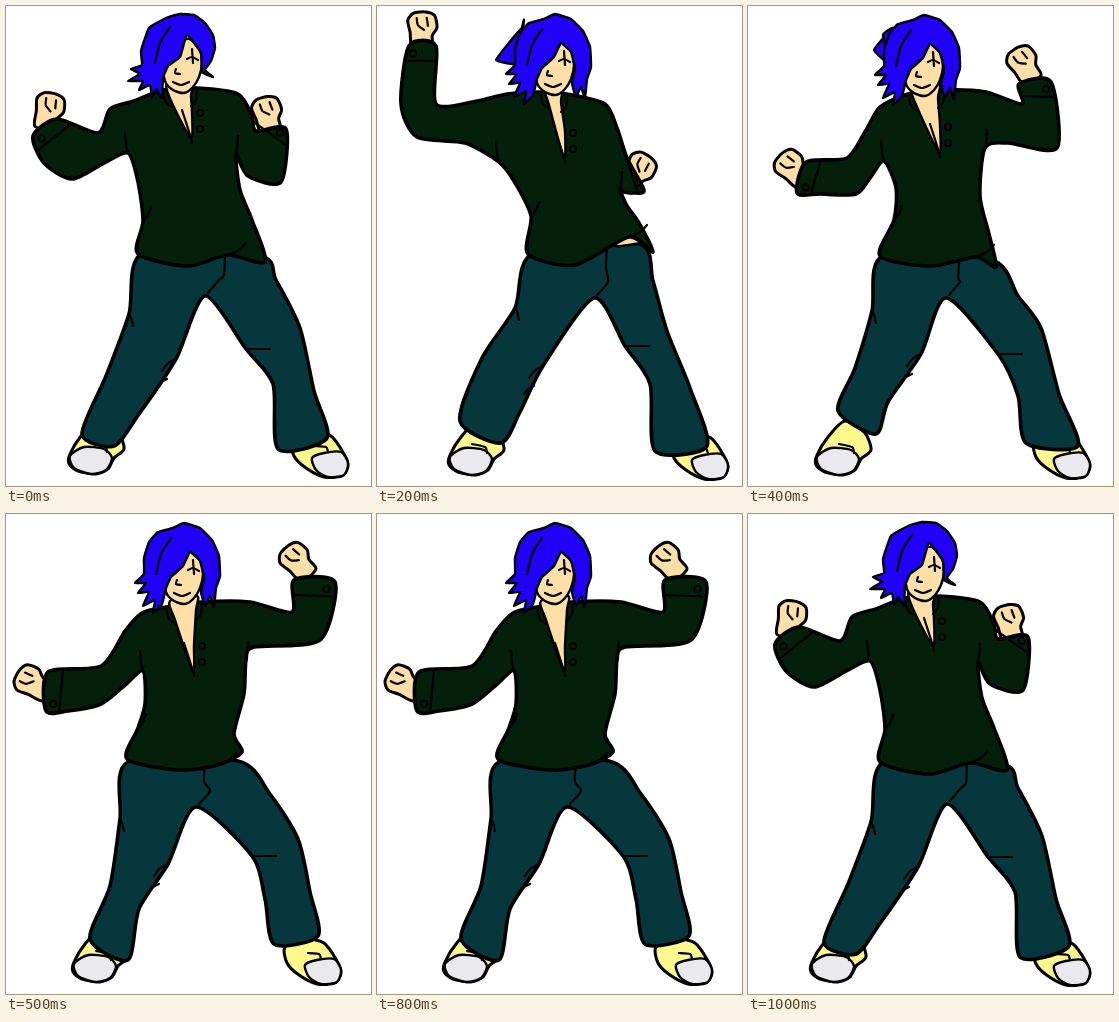
Write an HTML page that moves like this. It is 365x480 px and loops after 1.1 s.

```html
<!DOCTYPE html>
<html lang="en">
<head>
<meta charset="utf-8">
<title>Dance loop</title>
<style>
html, body { margin: 0; width: 100%; height: 100%; overflow: hidden; background: #fff; }
svg { display: block; width: 365px; height: 480px; }
path { stroke: #000; stroke-linejoin: round; stroke-linecap: round; }
</style>
</head>
<body>
<svg id="stage" viewBox="0 0 365 480"></svg>
<script>
const STEP = 100;
const ORDER = ['guard', 'windup', 'raise', 'guard', 'sway', 'spread', 'swing', 'high', 'spread', 'sway', 'guard'];
const SKIN = '#ffdfa8', HAIR = '#2000f6', SHIRT = '#04200a', DENIM = '#06373c', SHOE = '#fdf98c', TOE = '#e9e9ee';

const pts = s => s.split(',').map(p => p.trim().split(' ').map(Number));
const add = ([x, y], dx, dy) => [x + dx, y + dy];
const mix = (a, b, t = 0.5) => a.map((v, i) => v + (b[i] - v) * t);
const shift = (list, [dx, dy]) => list.map(p => add(p, dx, dy));

// Shirt: collar, left arm, left side, hem, right side, right arm, collar.
// Pants: outer left leg, inner left, crotch, inner right, outer right.
const pose = (shirt, pants, hands, shoes, head, tip, tufts = '') => ({
  shirt: pts(shirt), pants: pts(pants), hands: pts(hands), shoes: pts(shoes),
  head: pts(head), tip: pts(tip), tufts: tufts ? pts(tufts) : []
});

const guard = pose(
  '157 84,128 95,104 103,92 127,51 113,27 130,38 157,66 173,98 157,122 147,132 176,137 215,132 248,182 260,222 249,259 256,246 214,234 184,230 148,242 170,275 176,280 123,250 125,246 110,232 88,191 82',
  '137 247,123 308,100 370,76 428,108 440,133 408,170 353,199 290,240 343,267 378,272 443,321 432,308 385,294 322,270 274,254 250',
  '43 103,261 107', '0 0,0 0', '-1 -3', '185 132');

const raise = pose(
  '163 86,130 88,100 95,59 98,59 40,32 40,24 98,40 131,88 137,122 156,137 175,154 210,151 248,198 259,252 231,276 246,262 217,250 200,243 184,247 186,256 187,267 184,250 152,240 122,228 98,190 88',
  '155 248,138 302,105 352,83 415,124 437,143 406,166 360,217 292,248 340,273 378,278 445,330 440,313 382,290 325,276 275,262 238',
  '45 22,262 163', '9 1,9 2', '0 -1', '187 152', '119 54,147 14');

const spread = pose(
  '160 93,136 99,119 117,95 152,42 158,40 197,62 197,95 190,118 172,137 157,139 190,132 214,121 245,172 256,212 251,236 238,228 220,238 180,240 146,248 133,314 126,329 68,288 66,286 98,244 88,196 88',
  '122 248,114 305,104 372,84 425,122 446,133 395,162 350,190 293,246 342,259 385,268 430,312 422,304 378,292 325,264 280,232 247',
  '25 168,290 46', '4 0,-7 -1', '0 0', '187 157');

const high = pose(
  '160 92,134 100,128 112,130 164,88 234,108 262,118 258,128 230,136 192,140 168,137 196,130 224,124 241,180 254,218 252,244 246,231 215,236 184,246 150,262 134,328 104,338 32,298 34,300 81,244 75,196 92',
  '122 246,110 302,95 365,76 440,124 454,130 408,156 358,187 286,240 338,268 388,266 416,323 425,306 372,288 322,266 288,235 249',
  '88 250,312 18', '6 1,0 -4', '4 1', '188 144');

const sway = pose(
  '160 88,132 101,118 124,99 152,58 156,49 187,72 188,108 188,122 172,136 155,148 182,146 214,132 250,182 260,228 251,248 261,241 228,232 190,237 142,260 137,309 142,303 76,271 78,274 98,238 86,196 84',
  '135 250,124 305,107 362,90 405,128 428,140 396,173 348,198 292,250 348,270 390,278 437,330 440,311 388,293 322,270 290,244 254',
  '43 161,275 57', '5 1,0 1', '-2 0', '191 146', '126 44,135 29');

// Pose halfway between two others.
function between(a, b) {
  const mid = { ...b };
  for (const key of ['shirt', 'pants', 'hands', 'shoes', 'head', 'tip']) {
    mid[key] = a[key].map((p, i) => mix(p, b[key][i]));
  }
  return mid;
}

const windup = between(guard, raise);
windup.shirt = windup.shirt.map((p, i) => i > 3 && i < 7 ? add(p, -14, 2) : p);
windup.hands[0] = add(windup.hands[0], -17, 2);
const swing = between(spread, high);

guard.combed = true;
raise.belly = pts('238 240,252 228,266 236');
const poses = { guard, windup, raise, sway, spread, swing, high };

const combedHair = pts('175 11,189 12,200 20,208 32,210 45,206 58,200 67,208 74,197 69,196 50,182 32,175 54,163 63,158 75,157 95,151 86,147 94,145 82,134 87,138 78,123 78,135 71,126 66,137 62,136 48,144 25,161 15');
const looseHair = pts('178 9,194 14,206 26,213 42,214 62,210 74,208 93,204 82,199 92,195 78,198 64,194 47,184 38,177 52,165 63,160 74,156 90,147 99,149 86,137 92,143 78,132 79,140 69,129 69,138 60,138 44,143 28,152 18,167 14');
const face = pts('160 62,181 36,194 46,197 60,194 74,188 84,179 90,168 87,160 78');
const features = ['182 56,187 54,193 57', '187 46,188 60', '171 66,170 70,175 71', '168 79,176 82,184 79', '165 24,155 40,150 60'].map(pts);
const fist = pts('-20 -10,-4 -12,8 -14,15 -8,16 4,12 13,0 15,-8 10,-20 9');
const shoes = [
  { body: pts('75 430,64 448,63 458,72 465,90 468,102 463,108 452,118 443,112 426,92 414'),
    toe: pts('64 450,78 441,98 443,106 452,100 464,85 468,68 462'), lace: pts('86 437,99 440,101 446') },
  { body: pts('286 434,288 450,300 462,318 471,336 470,342 460,338 448,325 430,306 426'),
    toe: pts('306 452,318 447,335 446,342 457,338 469,322 471,310 464'), lace: pts('309 440,320 441,322 446') }
];

// Catmull-Rom curve; k sets how round the corners are.
function curve(p, closed, k) {
  const n = p.length, f = v => v.toFixed(1);
  const at = i => closed ? p[(i + n) % n] : p[Math.max(0, Math.min(n - 1, i))];
  let d = 'M' + p[0].map(f);
  for (let i = 0; i < (closed ? n : n - 1); i++) {
    const [a, b, c, e] = [at(i - 1), at(i), at(i + 1), at(i + 2)];
    const c1 = b.map((v, j) => f(v + (c[j] - a[j]) * k));
    const c2 = c.map((v, j) => f(v - (e[j] - b[j]) * k));
    d += `C${c1} ${c2} ${c.map(f)}`;
  }
  return closed ? d + 'Z' : d;
}

const fill = (p, color, width = 2.4, k = 0.13) =>
  `<path d="${curve(p, true, k)}" fill="${color}" stroke-width="${width}"/>`;
const line = (...p) => `<path d="${curve(p, false, 0.13)}" fill="none" stroke-width="2.2"/>`;
const fold = (p, dx, dy) => line(p, add(p, dx * 0.6, dy * 0.4), add(p, dx, dy));
const button = ([x, y]) =>
  `<circle cx="${x}" cy="${y}" r="3.2" fill="none" stroke="#000" stroke-width="1.8"/>`;

// A fist points away from the middle of its cuff.
function hand(center, cuffA, cuffB) {
  const m = mix(cuffA, cuffB);
  const a = Math.atan2(center[1] - m[1], center[0] - m[0]);
  const place = ([u, v]) => add(center, u * Math.cos(a) - v * Math.sin(a), u * Math.sin(a) + v * Math.cos(a));
  return fill(fist.map(place), SKIN, 3) + line(...pts('10 -5,3 -4,-2 2').map(place)) + line(...pts('10 5,2 6').map(place));
}

function cuff(inner, outer, elbowIn, elbowOut) {
  const back = (p, q) => mix(p, q, Math.min(0.6, 15 / Math.hypot(q[0] - p[0], q[1] - p[1])));
  const a = back(inner, elbowIn), b = back(outer, elbowOut);
  return line(a, b) + button(mix(mix(a, b, 0.65), outer, 0.5));
}

function trousers(p) {
  const fly = mix(p[0], p[15], 0.7), crotch = p[7];
  return fill(p, DENIM, 3.6) +
    line(fly, add(fly, -1, 20), add(crotch, 14, -16), add(crotch, 3, -3)) +
    fold(p[6], -14, 12) + fold(add(p[6], -9, 20), -10, 8) +
    fold(p[8], 24, 0) + fold(p[1], 4, 12);
}

function shirt(s, tip) {
  const left = s[0], right = s[25];
  const chest = [add(left, 4, -6), add(left, 9, 13), tip, add(tip, 1, -26), add(right, -6, 8), add(right, -5, -6)];
  return fill(s, SHIRT, 3.6) + fill(chest, SKIN) +
    line(left, add(left, 3, 12), add(left, 9, 17)) + line(right, add(right, -1, 12), add(right, -6, 18)) +
    line(add(tip, -9, -28), tip, add(tip, 1, 5)) +
    button(add(tip, 9, -25)) + button(add(tip, 9, -9)) +
    cuff(s[4], s[5], s[3], s[6]) + cuff(s[22], s[21], s[23], s[20]) +
    fold(s[9], -3, -20) + fold(s[18], 2, -18) + fold(s[11], 8, -14) + fold(s[14], 18, -12);
}

function head(p) {
  const at = p.head[0];
  const tufts = p.tufts.map(t => fill([[145, 22], t, [142, 58]], HAIR, 2.4, 0.05)).join('');
  return fill(shift(face, at), SKIN) + tufts +
    fill(shift(p.combed ? combedHair : looseHair, at), HAIR, 2.4, 0.06) +
    features.map(f => line(...shift(f, at))).join('');
}

function figure(p) {
  const s = p.shirt;
  const feet = shoes.map((shoe, i) => fill(shift(shoe.body, p.shoes[i]), SHOE, 3) +
    fill(shift(shoe.toe, p.shoes[i]), TOE) + line(...shift(shoe.lace, p.shoes[i]))).join('');
  return feet + trousers(p.pants) + (p.belly ? fill(p.belly, SKIN) : '') +
    hand(p.hands[0], s[4], s[5]) + hand(p.hands[1], s[21], s[22]) +
    shirt(s, p.tip[0]) + head(p);
}

const stage = document.getElementById('stage');
stage.innerHTML = Object.entries(poses)
  .map(([name, p]) => `<g id="${name}" visibility="hidden">${figure(p)}</g>`).join('');

const start = performance.now();
let shown = null;

function tick() {
  const t = Math.max(0, performance.now() - start);
  const name = ORDER[Math.floor(t / STEP) % ORDER.length];
  if (name !== shown) {
    if (shown) document.getElementById(shown).setAttribute('visibility', 'hidden');
    document.getElementById(name).setAttribute('visibility', 'visible');
    shown = name;
  }
  requestAnimationFrame(tick);
}
tick();
</script>
</body>
</html>
```
